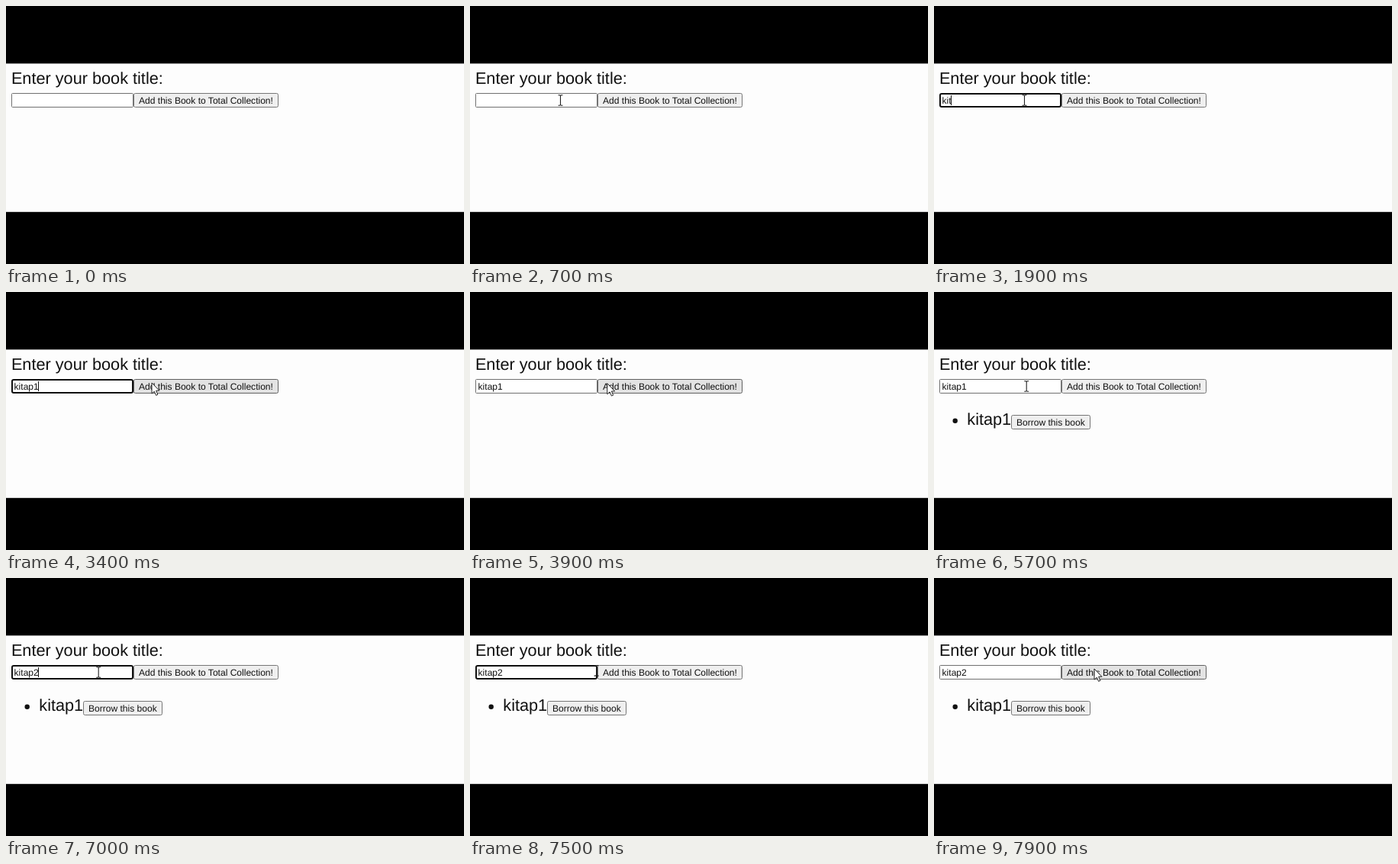
Animation, 600 px wide and 338 px high, one loop 8000 ms. Source, as an HTML page:

```html
<!DOCTYPE html>
<html lang="en">
<head>
<meta charset="utf-8">
<title>Book collection form</title>
<style>
  html, body { margin: 0; width: 100%; height: 100%; overflow: hidden; background: #000; }
  svg { display: block; width: 600px; height: 338px; }
  text { font-family: "Liberation Sans", Arial, sans-serif; text-rendering: geometricPrecision; fill: #111; white-space: pre; }
  .big { font-size: 21.7px; }
  .small { font-size: 12.05px; }
  .button { fill: #efefef; stroke: #767676; }
  .hover { fill: #e3e3e3; stroke: #606060; }
</style>
</head>
<body>
<svg viewBox="0 0 600 338">
  <rect width="600" height="338" fill="#000"/>
  <rect y="75.4" width="600" height="194.4" fill="#fdfdfd"/>
  <text class="big" x="6.9" y="102">Enter your book title:</text>

  <rect id="field" x="7.5" y="114.5" width="159" height="18" rx="1" fill="#fff" stroke="#707070"/>
  <rect id="ring" x="8" y="115" width="158" height="17" rx="2" fill="#fff" stroke="#101010" stroke-width="2"/>
  <text id="value" class="small" x="10.6" y="128"></text>
  <rect id="caret" y="117" width="1" height="13" fill="#111"/>

  <rect id="add" class="button" x="167.5" y="114.5" width="189" height="18" rx="2"/>
  <text class="small" x="174" y="128">Add this Book to Total Collection!</text>

  <g id="item">
    <circle cx="27.7" cy="168.8" r="3.2" fill="#111"/>
    <text class="big" x="43.3" y="174.4">kitap1</text>
    <rect class="button" x="101.5" y="161.5" width="103" height="18" rx="2"/>
    <text class="small" x="108" y="175">Borrow this book</text>
  </g>

  <path id="arrow" d="M0 0V14.2L3.3 11.2L5.6 16.4L7.9 15.4L5.6 10.3H9.9Z" fill="#fff" stroke="#222" stroke-width="1"/>
  <path id="beam" d="M-3 -6.8H-1L0 -6L1 -6.8H3M0 -6V6M-3 6.8H-1L0 6L1 6.8H3" fill="none" stroke="#222" stroke-width="1.1"/>
</svg>
<script>
const LOOP = 8000, STEP = 100;
const $ = id => document.getElementById(id);
const show = (el, on) => el.setAttribute('visibility', on ? 'visible' : 'hidden');
const within = (t, spans) => spans.some(([a, b]) => t >= a && t < b);

// pointer stops: time, x, y
const path = [
  [100, 338, 198], [500, 160, 96], [700, 118.5, 123.5], [2800, 118.5, 123.5],
  [3400, 191, 119], [3700, 191, 119], [4500, 119, 123.5], [4700, 121.2, 123.5],
  [7200, 121.2, 123.5], [7800, 210, 119], [LOOP, 210, 119]
];
const typing = [
  [0, ''], [1500, 'k'], [1700, 'ki'], [1900, 'kit'], [2100, 'kita'],
  [2300, 'kitap'], [2600, 'kitap1'], [6700, 'kitap'], [6900, 'kitap2']
];
const focus = [[800, 3500], [6100, 7800]];
const caretOff = [[1300, 1500], [2900, 3400], [7400, 7800]];

function pointer(t) {
  const i = Math.max(1, path.findIndex(p => p[0] >= t));
  const [t0, x0, y0] = path[i - 1], [t1, x1, y1] = path[i];
  const u = Math.min(1, Math.max(0, (t - t0) / (t1 - t0)));
  const e = u * u * (3 - 2 * u);
  return [x0 + (x1 - x0) * e, y0 + (y1 - y0) * e];
}

function draw(t) {
  const [x, y] = pointer(t);
  const inRow = y > 114 && y < 133;
  const overField = inRow && x > 7 && x < 167;
  const overTitle = y > 84 && y < 108 && x < 205;
  const overAdd = inRow && x >= 167 && x < 357;
  const beam = overField || overTitle;
  const focused = within(t, focus);

  show($('ring'), focused);
  show($('field'), !focused);
  const value = $('value');
  value.textContent = typing.filter(k => k[0] <= t).pop()[1];
  const width = value.textContent ? value.getComputedTextLength() : 0;
  $('caret').setAttribute('x', Math.round(10.2 + width));
  show($('caret'), focused && !within(t, caretOff));

  $('add').setAttribute('class', overAdd ? 'button hover' : 'button');
  show($('item'), t >= 5700);

  const place = `translate(${x.toFixed(1)} ${y.toFixed(1)})`;
  $('arrow').setAttribute('transform', place);
  $('beam').setAttribute('transform', place);
  show($('arrow'), t >= 100 && !beam);
  show($('beam'), t >= 100 && beam);
}

const start = performance.now();
function tick(now) {
  const t = Math.max(0, now - start) % LOOP;
  draw(Math.floor(t / STEP) * STEP);
  requestAnimationFrame(tick);
}
draw(0);
requestAnimationFrame(tick);
</script>
</body>
</html>
```
